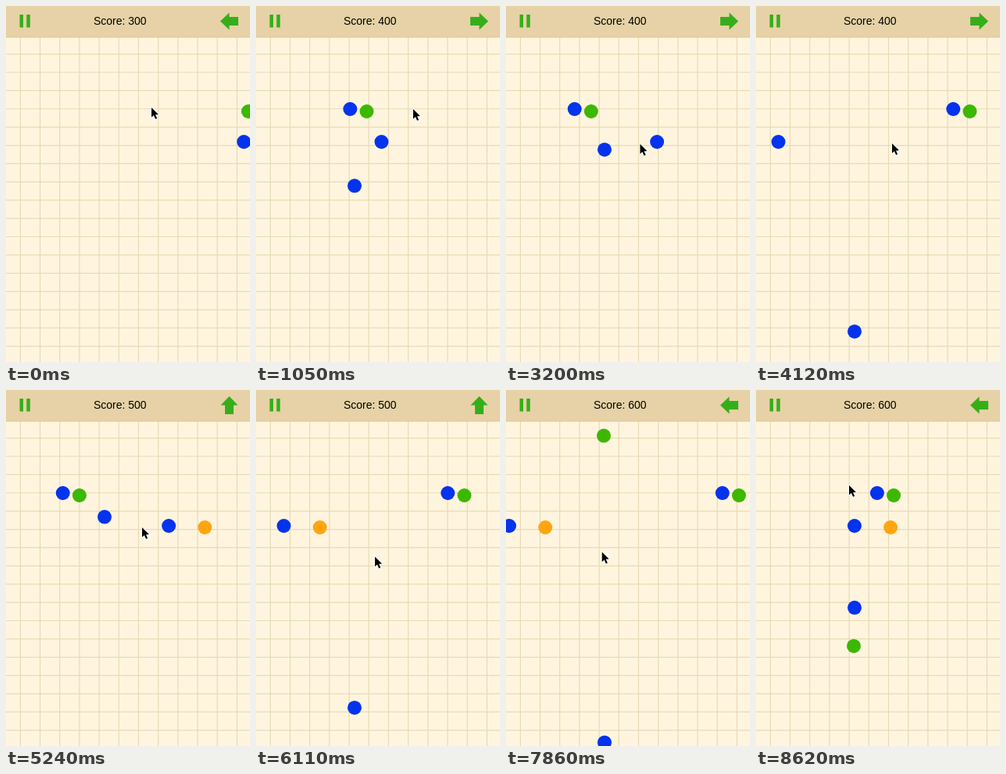
These frames come from a looping animation (312 px wide and 456 px high, 8.66 s). An HTML page with a canvas:

```html
<!DOCTYPE html>
<html lang="en">
<head>
<meta charset="utf-8">
<title>Ball game</title>
<style>
  html, body { margin: 0; width: 312px; height: 456px; overflow: hidden; background: #fff5df; }
  canvas { display: block; }
</style>
</head>
<body>
<canvas id="stage" width="312" height="456"></canvas>
<script>
const ctx = document.getElementById('stage').getContext('2d');
const W = 312, H = 456, LOOP = 8660;
const BLUE = '#0433ee', GREEN = '#3cb800', ORANGE = '#ffa510', ICON = '#36ae1a';
const LEFT = Math.PI, RIGHT = 0, UP = -Math.PI / 2;
const SPEED_X = 0.1603, SPEED_Y = SPEED_X * 1.417;
const TOP = 13, RANGE_Y = 442;
const GLIDE = 1100;

// Each ball starts at a click and then moves one way, wrapping at the edges.
const balls = [
  { from: 0, x: 304, y: 174, turn: RIGHT, color: BLUE },
  { from: 0, x: 310, y: 135, turn: LEFT, color: GREEN },
  { from: 0, x: 126, y: 27, turn: UP, color: BLUE },
  { from: 548, x: 201, y: 132, turn: LEFT, color: BLUE },
  { from: 4734, x: 173, y: 176, turn: RIGHT, color: ORANGE },
  { from: 6970, x: 125, y: 261, turn: UP, color: GREEN }
];

// The pointer glides to each stop and rests there.
const stops = [
  { at: 0, x: 186, y: 130 },
  { at: 500, x: 201, y: 132 },
  { at: 2330, x: 145, y: 186 },
  { at: 3400, x: 174, y: 176 },
  { at: 6700, x: 125, y: 260 },
  { at: 8500, x: 119, y: 122 }
];

const mod = (v, n) => ((v % n) + n) % n;
const smooth = u => u * u * (3 - 2 * u);
const clamp = u => Math.min(1, Math.max(0, u));

function polygon(points) {
  ctx.beginPath();
  points.forEach(p => ctx.lineTo(...p));
  ctx.closePath();
}

function drawGrid() {
  ctx.fillStyle = '#fff5df';
  ctx.fillRect(0, 0, W, H);
  ctx.strokeStyle = '#e8dab3';
  ctx.lineWidth = 1.2;
  ctx.beginPath();
  for (let x = 18.4; x < W; x += 25.18) {
    ctx.moveTo(x, 40);
    ctx.lineTo(x, H);
  }
  for (let y = 61.6; y < H; y += 23.39) {
    ctx.moveTo(0, y);
    ctx.lineTo(W, y);
  }
  ctx.stroke();
}

function drawBall({ from, x, y, turn, color }, t) {
  const age = t - from;
  x = mod(x + Math.cos(turn) * SPEED_X * age, W);
  y = TOP + mod(y + Math.sin(turn) * SPEED_Y * age - TOP, RANGE_Y);
  ctx.fillStyle = color;
  ctx.beginPath();
  ctx.arc(x, y, 9, 0, 7);
  ctx.fill();
}

function drawHeader(score, turn) {
  ctx.fillStyle = '#e6d2a6';
  ctx.fillRect(0, 0, W, 40);
  ctx.fillStyle = '#dcc79b';
  ctx.fillRect(0, 39.5, W, 1);
  ctx.fillStyle = ICON;
  for (const x of [17.5, 26.3]) ctx.fillRect(x, 11, 4.5, 16.5);

  ctx.save();
  ctx.translate(285.5, 19.6);
  ctx.rotate(turn);
  polygon([[11.5, 0], [0, -11], [0, -5.5], [-11.5, -5.5], [-11.5, 5.5], [0, 5.5], [0, 11]]);
  ctx.fill();
  ctx.restore();

  ctx.fillStyle = '#000';
  ctx.font = '14px "Liberation Sans", Arial, sans-serif';
  ctx.textAlign = 'center';
  ctx.fillText('Score: ' + score, 145.8, 24);
}

function drawPointer(t) {
  let { x, y } = stops[0];
  for (const stop of stops) {
    const u = smooth(clamp(1 - (stop.at - t) / Math.min(GLIDE, stop.at || 1)));
    x += (stop.x - x) * u;
    y += (stop.y - y) * u;
  }
  ctx.save();
  ctx.translate(x, y);
  ctx.scale(0.9, 0.9);
  polygon([[0, 0], [0, 14], [3.2, 11], [5.6, 16.5], [8, 15.5], [5.6, 10.2], [10, 10]]);
  ctx.lineJoin = 'round';
  ctx.lineWidth = 2;
  ctx.strokeStyle = '#fff';
  ctx.stroke();
  ctx.fillStyle = '#000';
  ctx.fill();
  ctx.restore();
}

function draw(t) {
  const live = balls.filter(ball => t >= ball.from);
  const next = balls[live.length] || { turn: LEFT };
  drawGrid();
  live.forEach(ball => drawBall(ball, t));
  drawHeader(live.length * 100, next.turn);
  drawPointer(t);
}

const start = performance.now();
function tick() {
  draw((performance.now() - start) % LOOP);
  requestAnimationFrame(tick);
}
tick();
</script>
</body>
</html>
```
